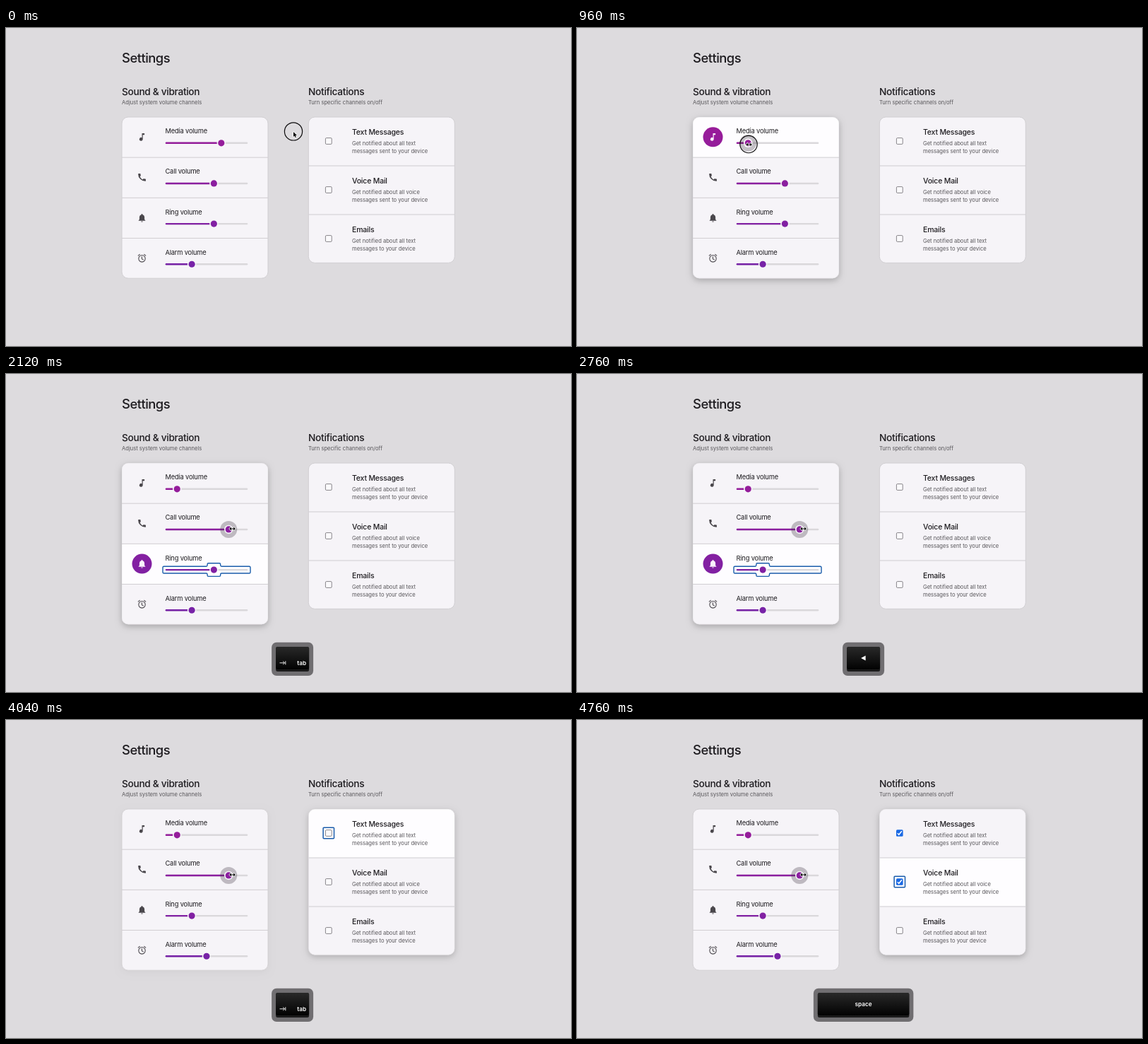
These frames come from a looping animation (800 px wide and 450 px high, 5 s). An HTML page with a canvas:

```html
<!DOCTYPE html>
<html lang="en">
<head>
<meta charset="utf-8">
<title>Settings</title>
<style>
html, body { margin: 0; width: 100%; height: 100%; overflow: hidden; background: #dddbde; }
canvas { display: block; width: 800px; height: 450px; }
</style>
</head>
<body>
<canvas id="stage"></canvas>
<script>
const LOOP = 5000;
const canvas = document.getElementById('stage');
const ctx = canvas.getContext('2d');
const dpr = window.devicePixelRatio || 1;
canvas.width = 800 * dpr;
canvas.height = 450 * dpr;

const FONT = 'Inter, "Open Sans", sans-serif';
const INK = '#1d1b1f', MUTED = '#59575b', LINE = '#d0ced1', BLUE = '#1a5cab';
const ROW = 57.15, ITEM = 69;

const brand = ctx.createLinearGradient(0, 120, 0, 354);
brand.addColorStop(0, '#9c1b98');
brand.addColorStop(1, '#7423a8');

const icons = [
  'M12 3h6v4h-4v10a4 4 0 1 1-2-3.45z',
  'M20 15.4q-1.9 0-3.5-.6-.6-.1-1 .3l-1.6 1.9Q9 14.5 7 10.2l2-1.7q.4-.4.2-1Q8.7 6 8.7 4q0-1-1-1H4.2Q3 3 3 4A17 17 0 0 0 20 21q1 0 1-1.2v-3.4q0-1-1-1z',
  'M10 20h4a2 2 0 0 1-4 0zM4 19v-1l2-2v-5q0-5 4.5-6.3V4a1.5 1.5 0 0 1 3 0v.7Q18 6 18 11v5l2 2v1z',
  'M12 5a8 8 0 1 0 .01 0M11.75 8v5.5l4 2.4M2.6 6.5l4.6-3.9M21.4 6.5l-4.6-3.9'
].map(d => new Path2D(d));

// value steps: [time, value]
const sliders = [
  { name: 'Media volume', steps: [[0, 7], [600, 6], [640, 5], [680, 4], [720, 3], [780, 2], [840, 1]], hover: [460, 1000] },
  { name: 'Call volume', steps: [[0, 6], [1440, 7], [1520, 8]], hover: [1060, LOOP] },
  { name: 'Ring volume', steps: [[0, 6], [2400, 5], [2560, 4], [2720, 3]] },
  { name: 'Alarm volume', steps: [[0, 3], [3480, 4], [3600, 5]] }
];
const checks = [
  { name: 'Text Messages', lines: ['Get notified about all text', 'messages sent to your device'], on: 4160 },
  { name: 'Voice Mail', lines: ['Get notified about all voice', 'messages sent to your device'], on: 4680 },
  { name: 'Emails', lines: ['Get notified about all text', 'messages to your device'], on: Infinity }
];

// focus spans: sliders first, then checkboxes
const focus = [[500, 1300], [1300, 1840], [1840, 3060], [3060, 3760], [3760, 4360], [4360, LOOP]];
const KEYBOARD = 1840;
const keys = [[0, ''], [1840, 'tab'], [2400, 'left'], [3060, 'tab'], [3480, 'right'],
  [3760, 'tab'], [4160, 'space'], [4360, 'tab'], [4680, 'space']];
const path = [[0, 407, 147], [460, 305, 163], [500, 304, 163], [720, 248, 164], [860, 243, 164],
  [960, 243, 165], [1120, 290, 218], [1290, 295, 219], [1460, 320, 219]];
const presses = [[500, 920], [1290, 1600]];

const clamp = p => Math.max(0, Math.min(1, p));
const smooth = p => p * p * (3 - 2 * p);
const easeOut = p => 1 - (1 - clamp(p)) ** 2;
const mix = (a, b, p) => a + (b - a) * p;
const last = (list, t) => list.filter(s => s[0] <= t).pop()[1];
const inside = (span, t) => !!span && t >= span[0] && t < span[1];

function level(span, t, ms = 300) {
  if (!span || t < span[0]) return 0;
  return t < span[1] ? easeOut((t - span[0]) / ms) : 1 - easeOut((t - span[1]) / ms);
}

function text(str, x, y, size, weight = 400, color = INK, spacing = 0, align = 'left') {
  ctx.font = `${weight} ${size}px ${FONT}`;
  ctx.letterSpacing = spacing + 'px';
  ctx.textAlign = align;
  ctx.fillStyle = color;
  ctx.fillText(str, x, y);
}

function box(x, y, w, h, r) {
  ctx.beginPath();
  ctx.roundRect(x, y, w, h, r);
}

function disc(x, y, r, fill) {
  ctx.beginPath();
  ctx.arc(x, y, r, 0, Math.PI * 2);
  ctx.fillStyle = fill;
  ctx.fill();
}

function stroke(color, width) {
  ctx.strokeStyle = color;
  ctx.lineWidth = width;
  ctx.stroke();
}

function surface(a) {
  return `rgb(${mix(246, 254, a)}, ${mix(244, 253, a)}, ${mix(248, 255, a)})`;
}

function card(x, y, w, h, step, glow, levels) {
  ctx.save();
  ctx.shadowColor = `rgba(0, 0, 0, ${0.25 * glow})`;
  ctx.shadowBlur = 10 * dpr;
  ctx.shadowOffsetY = 3 * dpr;
  box(x, y, w, h, 9);
  ctx.fillStyle = surface(0);
  ctx.fill();
  ctx.restore();

  ctx.save();
  box(x, y, w, h, 9);
  ctx.clip();
  levels.forEach((a, i) => {
    ctx.fillStyle = surface(a);
    ctx.fillRect(x, y + i * step, w, step + 1);
  });
  ctx.fillStyle = LINE;
  for (let i = 1; i < levels.length; i++) ctx.fillRect(x, y + i * step - 0.5, w, 1);
  ctx.restore();
  ctx.globalAlpha = 1 - 0.65 * glow;
  box(x, y, w, h, 9);
  stroke(LINE, 1);
  ctx.globalAlpha = 1;
}

function icon(i, y, a, active) {
  const x = 192.5;
  if (active) {
    ctx.globalAlpha = Math.min(1, a * 3);
    disc(x, y, 11.2 + 2.8 * a, brand);
    ctx.globalAlpha = 1;
  }
  ctx.save();
  ctx.translate(x, y);
  ctx.scale(0.6, 0.6);
  ctx.translate(-12, -12);
  ctx.fillStyle = ctx.strokeStyle = active ? '#fbf3fc' : '#4a474c';
  ctx.lineWidth = 1.8;
  if (i === 3) ctx.stroke(icons[i]);
  else ctx.fill(icons[i]);
  ctx.restore();
}

function sliderOutline(x, y, gap) {
  const l = 225.7 - gap, r = 342.3 + gap, h = 1.2 + gap, b = 5.6 + gap;
  const half = [[x - b, -h], [x - b, -b], [x + b, -b], [x + b, -h], [r, -h]];
  const pts = [[l, -h], ...half, [r, h], [x + b, h], [x + b, b], [x - b, b], [x - b, h], [l, h]];
  ctx.beginPath();
  ctx.moveTo((l + x - b) / 2, y - h);
  for (let i = 1; i <= pts.length; i++) {
    const p = pts[i % pts.length], q = pts[(i + 1) % pts.length];
    ctx.arcTo(p[0], y + p[1], q[0], y + q[1], 1.6);
  }
  ctx.closePath();
  stroke(BLUE, 1.4);
}

function slider(i, t) {
  const s = sliders[i], top = i * ROW, y = 162.8 + top;
  const a = level(focus[i], t), active = inside(focus[i], t);
  const x = 231.8 + 10.43 * last(s.steps, t);
  icon(i, 154.3 + top, a, active);
  text(s.name, 225.5, 149.3 + top, 9.3, 400, INK, -0.18);

  box(225.7, y - 1.2, 116.6, 2.4, 1.2);
  ctx.fillStyle = '#dad8db';
  ctx.fill();
  box(225.7, y - 1.2, x - 225.7, 2.4, 1.2);
  ctx.fillStyle = brand;
  ctx.fill();

  const halo = level(s.hover, t, 100);
  if (halo > 0) disc(x, y, mix(6, 12, halo), 'rgba(60, 50, 62, 0.3)');
  disc(x, y, 6.2, surface(a));
  disc(x, y, 4.6, brand);
  if (active && focus[i][0] >= KEYBOARD) {
    sliderOutline(x, y, 3.7 * easeOut((t - focus[i][0]) / 250));
  }
}

function checkbox(i, t) {
  const c = checks[i], top = i * ITEM, x = 456.8, y = 160 + top;
  text(c.name, 490, 150.8 + top, 10.5, 500, INK, -0.19);
  c.lines.forEach((line, n) => text(line, 490, 166 + n * 11.2 + top, 7.6, 400, MUTED));

  if (t >= c.on) {
    box(x - 4.8, y - 4.8, 9.6, 9.6, 1.5);
    ctx.fillStyle = '#1a69e4';
    ctx.fill();
    ctx.beginPath();
    ctx.moveTo(x - 3, y + 0.2);
    ctx.lineTo(x - 1, y + 2.3);
    ctx.lineTo(x + 3, y - 2.7);
    stroke('#fff', 1.5);
  } else {
    box(x - 4.4, y - 4.4, 8.8, 8.8, 1.3);
    ctx.fillStyle = '#fbfafc';
    ctx.fill();
    stroke('#7b797d', 0.9);
  }
  const span = focus[i + 4];
  if (inside(span, t)) {
    const h = mix(5, 7.7, easeOut((t - span[0]) / 250));
    box(x - h, y - h, h * 2, h * 2, 1);
    stroke(BLUE, 1.5);
  }
}

function tabSymbol() {
  ctx.beginPath();
  ctx.moveTo(387.5, 408.8);
  ctx.lineTo(394.5, 408.8);
  ctx.moveTo(392.2, 406.5);
  ctx.lineTo(394.5, 408.8);
  ctx.lineTo(392.2, 411.1);
  ctx.moveTo(395.8, 406.3);
  ctx.lineTo(395.8, 411.3);
  stroke('#fff', 0.9);
}

function keyCap(name) {
  if (!name) return;
  const w = name === 'space' ? 141.5 : 59, x = 405.6 - w / 2;
  box(x, 379.8, w, 47.2, 7);
  ctx.fillStyle = '#706e71';
  ctx.fill();
  const shade = ctx.createLinearGradient(0, 386, 0, 418);
  shade.addColorStop(0, '#292929');
  shade.addColorStop(1, '#020202');
  box(x + 6, 386, w - 12, 35, 2.5);
  ctx.fillStyle = '#1b1b1b';
  ctx.fill();
  box(x + 6, 386, w - 12, 32, 2.5);
  ctx.fillStyle = shade;
  ctx.fill();

  if (name === 'tab') {
    tabSymbol();
    text('tab', 425, 411.5, 8.2, 600, '#fff', 0, 'right');
  } else if (name === 'space') {
    text('space', 405.6, 404.6, 8.2, 600, '#fff', 0, 'center');
  } else {
    const d = name === 'left' ? -1 : 1;
    ctx.beginPath();
    ctx.moveTo(405.6 + 3.5 * d, 402);
    ctx.lineTo(405.6 - 3 * d, 398.5);
    ctx.lineTo(405.6 - 3 * d, 405.5);
    ctx.fillStyle = '#fff';
    ctx.fill();
  }
}

function pointerAt(t) {
  const i = path.findIndex(p => p[0] > t);
  if (i < 0) return path[path.length - 1].slice(1);
  const [t0, x0, y0] = path[i - 1], [t1, x1, y1] = path[i];
  const p = smooth((t - t0) / (t1 - t0));
  return [mix(x0, x1, p), mix(y0, y1, p)];
}

function glyph(points, x, y) {
  ctx.beginPath();
  points.forEach(([px, py]) => ctx.lineTo(x + px, y + py));
  ctx.closePath();
  ctx.lineJoin = 'round';
  stroke('#fff', 1.4);
  ctx.fillStyle = '#000';
  ctx.fill();
  ctx.lineJoin = 'miter';
}

const arrow = [[0, 0], [0, 7], [1.6, 5.5], [2.7, 8], [3.9, 7.4], [2.8, 5], [5, 4.9]];
const resize = [[-4.3, 0], [-1.8, -2.4], [-1.8, -0.6], [1.8, -0.6], [1.8, -2.4],
  [4.3, 0], [1.8, 2.4], [1.8, 0.6], [-1.8, 0.6], [-1.8, 2.4]];

function pointer(t) {
  const [x, y] = pointerAt(t);
  const over = x < 345 && (Math.abs(y - 163) < 9 || Math.abs(y - 220) < 9);
  if (over) glyph(resize, x + 0.5, y);
  else glyph(arrow, x, y);

  const fade = 1 - clamp((t - 1680) / 120);
  if (fade > 0) {
    const press = Math.max(...presses.map(s => level(s, t, 80)));
    ctx.globalAlpha = fade;
    ctx.beginPath();
    ctx.arc(x, y - 0.6 * (1 - press), mix(12.6, 11, press), 0, Math.PI * 2);
    stroke('#0c0b0c', 1.2);
    ctx.globalAlpha = 1;
  }
}

function draw(t) {
  ctx.setTransform(dpr, 0, 0, dpr, 0, 0);
  ctx.fillStyle = '#dddbde';
  ctx.fillRect(0, 0, 800, 450);

  text('Settings', 164, 49, 18.4, 500, INK, -0.5);
  text('Sound & vibration', 164, 94.8, 13.7, 500, INK, -0.32);
  text('Adjust system volume channels', 164, 108.3, 7.6, 400, MUTED);
  text('Notifications', 428, 94.8, 13.7, 500, INK, -0.3);
  text('Turn specific channels on/off', 428, 108.3, 7.6, 400, MUTED);

  const levels = focus.map(span => level(span, t));
  card(164, 126, 207, 228.2, ROW, level([500, 3760], t, 500), levels.slice(0, 4));
  card(428.3, 126, 207, 206.4, ITEM, level([3760, LOOP], t, 500), [...levels.slice(4), 0]);
  sliders.forEach((s, i) => slider(i, t));
  checks.forEach((c, i) => checkbox(i, t));
  keyCap(last(keys, t));
  pointer(t);
}

const start = performance.now();
function frame() {
  draw((performance.now() - start) % LOOP);
  requestAnimationFrame(frame);
}
frame();
</script>
</body>
</html>
```
